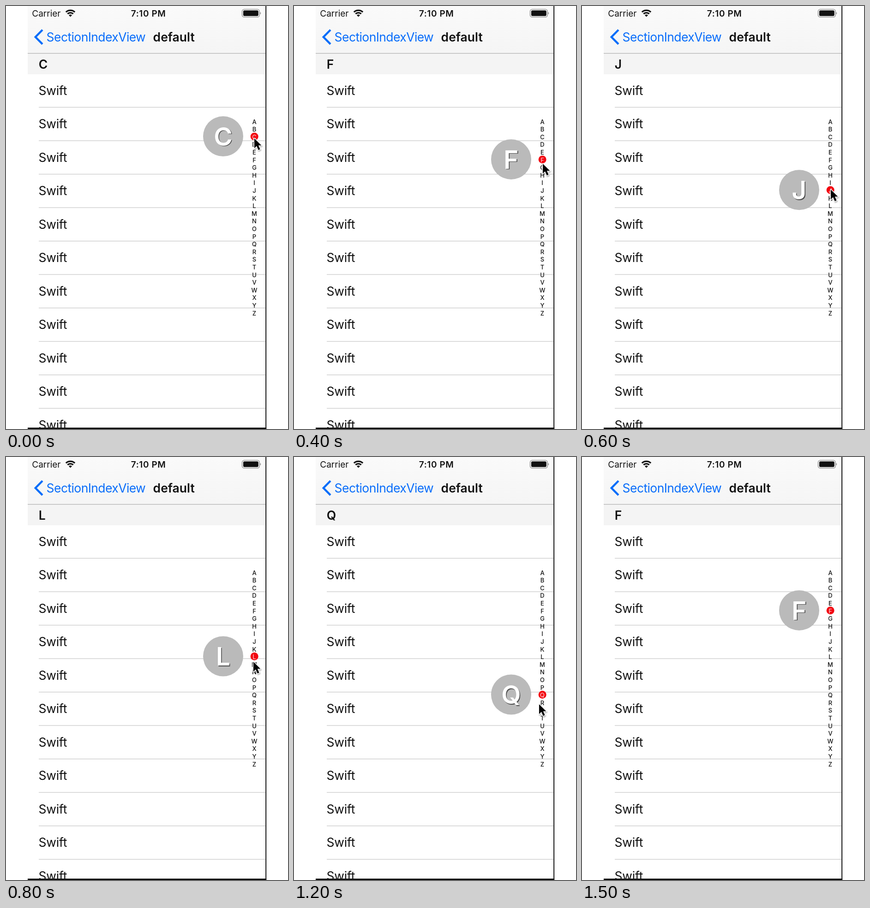
Write an HTML page that moves like this. It is 611 px wide and 917 px high and loops after 1.6 s.

```html
<!DOCTYPE html>
<html lang="en">
<head>
<meta charset="utf-8">
<title>Section index</title>
<style>
  html, body { margin: 0; width: 100%; height: 100%; overflow: hidden; background: #fff; }
  svg { display: block; width: 611px; height: 917px; font-family: Inter, Roboto, sans-serif; fill: #111; }
  .status { font-size: 19px; }
  .bold { font-weight: 600; }
  .body { font-size: 26.5px; }
  .row { letter-spacing: -.15px; }
  .back { fill: #096dfa; letter-spacing: -.58px; }
  .index { font-size: 13px; font-weight: 500; text-anchor: middle; }
  .index .on { fill: #ffe4e4; font-weight: 400; }
  .big { font-size: 55px; font-weight: 600; text-anchor: middle; }
</style>
</head>
<body>
<svg viewBox="0 0 611 917">
  <defs>
    <linearGradient id="bar" x2="0" y2="1">
      <stop stop-color="#fafafa"/>
      <stop offset="1" stop-color="#f5f5f5"/>
    </linearGradient>
  </defs>

  <rect x="47" width="516" height="103" fill="url(#bar)"/>
  <rect x="47" y="103" width="516" height="45" fill="#f4f4f4"/>
  <rect x="47" y="102" width="516" height="1.2" fill="#aeaeae"/>

  <text class="status" x="56.3" y="22.5">Carrier</text>
  <g fill="none" stroke="#111" stroke-width="3.2">
    <path d="M129.8 13.2a14 14 0 0 1 19.4 0M133.4 17a8.8 8.8 0 0 1 12.2 0"/>
  </g>
  <path d="M139.5 23.6l-3.5-3.6a5 5 0 0 1 7 0z"/>
  <text class="status bold" x="270.8" y="22.5" letter-spacing=".6">7:10 PM</text>
  <rect x="511.6" y="7.1" width="37.6" height="17" rx="4.6" fill="none" stroke="#8c8c8c" stroke-width="1.4"/>
  <rect x="514" y="9.5" width="32.8" height="12.2" rx="2.6"/>
  <path d="M550.6 13a3 3 0 0 1 0 5.4z" fill="#8c8c8c"/>

  <path d="M79 51.8L63.8 67.2L79 82.6" fill="none" stroke="#096dfa" stroke-width="4.4"/>
  <text class="body back" x="87.6" y="76.8">SectionIndexView</text>
  <text class="body bold" x="318.6" y="76.8">default</text>
  <text class="body bold" id="header" x="70.8" y="135.6"></text>

  <g id="rows"></g>
  <circle id="dot" cx="538.2" r="8.5" fill="#f20510"/>
  <g id="index" class="index"></g>

  <g id="bubble">
    <circle r="43.5" fill="#bababa"/>
    <text class="big" x="1.6" y="21.8" fill="#4c4c4c"></text>
    <text class="big" y="20.2" fill="#fff"></text>
  </g>

  <rect x="562.2" width="2" height="917"/>
  <rect x="47" y="914" width="517.2" height="3"/>

  <g id="cursor" stroke-linejoin="round">
    <path id="arrow" d="M0 0V21.2L5 16.6L8.8 25.2L12.6 23.5L8.9 15.3H15.4Z"
      fill="#000" stroke="#fff" stroke-width="3" paint-order="stroke"
      style="filter: drop-shadow(1px 2px 1.2px rgba(0,0,0,.3))"/>
  </g>
</svg>

<script>
const $ = id => document.getElementById(id);
const STEP = 100;
const letters = [..."ABCDEFGHIJKLMNOPQRSTUVWXYZ"];
const picks = "CCDEFHJKLNOPQNJF";
// Pointer keys: step, x, y. The pointer is away after the last one.
const path = [[0, 538, 287], [4, 539, 342], [6, 539, 398], [8, 536, 444], [10, 532, 483], [12, 531, 536]];

function add(parent, tag, attrs, text = "") {
  const el = document.createElementNS("http://www.w3.org/2000/svg", tag);
  for (const key in attrs) el.setAttribute(key, attrs[key]);
  el.textContent = text;
  parent.append(el);
  return el;
}

for (let i = 0; i < 11; i++) {
  const y = 192.6 + i * 72.52;
  add($("rows"), "text", { class: "body row", x: 70.4, y }, "Swift");
  add($("rows"), "rect", { x: 71, y: y + 26.3, width: 491.5, height: 1.2, fill: "#c6c6c6" });
}

const labels = letters.map((c, i) =>
  add($("index"), "text", { x: 538, y: 255.6 + i * 16.6 }, c));
const bigText = $("bubble").querySelectorAll("text");

function pointerAt(step) {
  const n = path.findIndex(key => key[0] >= step);
  if (n < 0) return null;
  const b = path[n], a = path[Math.max(0, n - 1)];
  const k = b === a ? 0 : (step - a[0]) / (b[0] - a[0]);
  return [a[1] + (b[1] - a[1]) * k, a[2] + (b[2] - a[2]) * k];
}

function show(step) {
  const letter = picks[step];
  const active = letters.indexOf(letter);
  const y = 249.7 + active * 16.6;
  $("header").textContent = letter;
  bigText.forEach(t => t.textContent = letter);
  labels.forEach((t, i) => t.classList.toggle("on", i === active));
  $("dot").setAttribute("cy", y);
  $("bubble").setAttribute("transform", `translate(470.5 ${y - .3})`);

  const tip = pointerAt(step);
  $("cursor").style.display = tip ? "" : "none";
  if (tip) $("cursor").setAttribute("transform", `translate(${tip})`);
}

let last = -1;
function tick() {
  const step = Math.floor(performance.now() / STEP) % picks.length;
  if (step !== last) show(last = step);
  requestAnimationFrame(tick);
}
tick();
</script>
</body>
</html>
```
